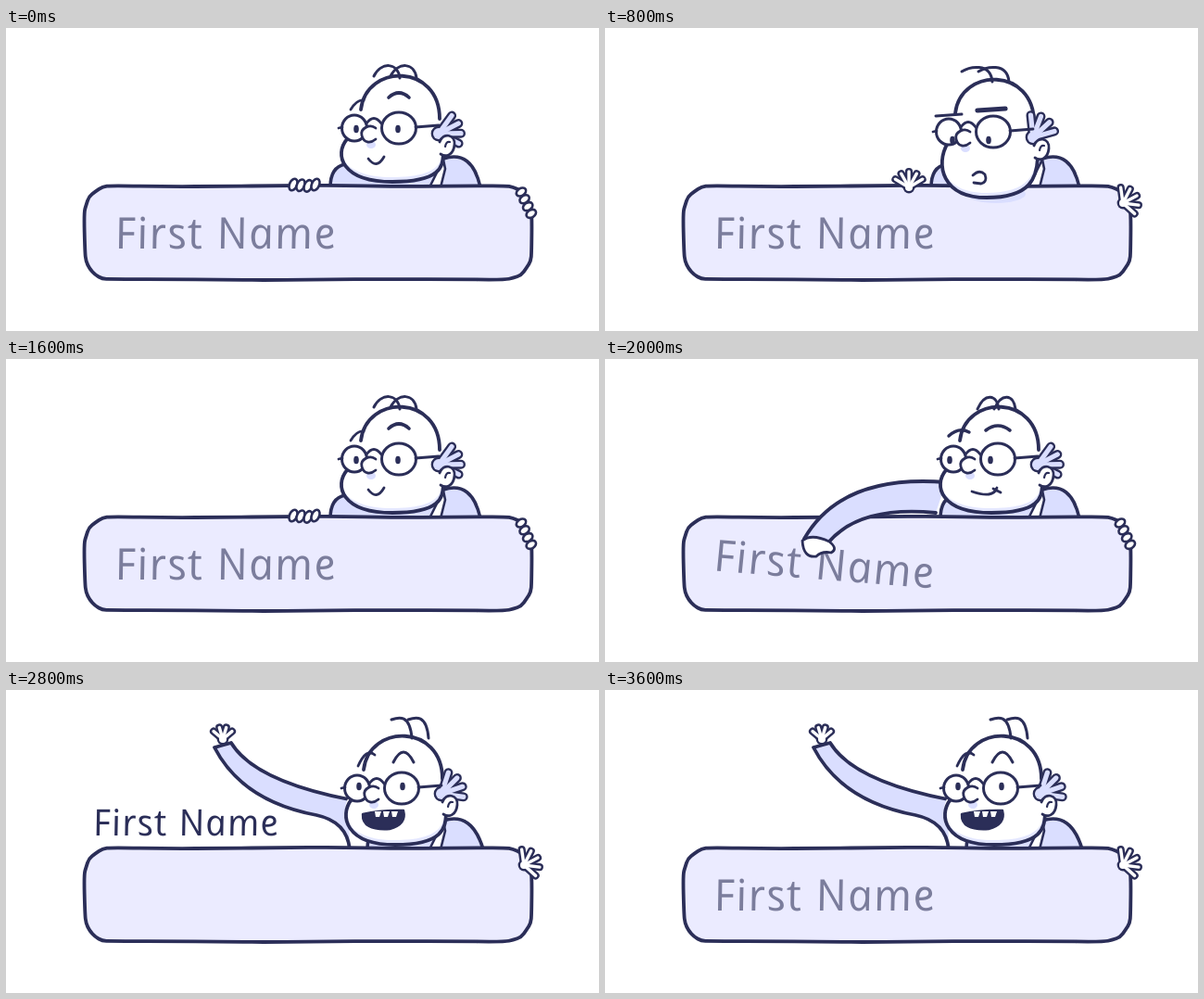
Animation of 640 by 327 pixels, one loop 3.8 s. Source, as an HTML page:

```html
<!DOCTYPE html>
<html lang="en">
<head>
<meta charset="utf-8">
<title>First Name field</title>
<style>
  html, body { margin: 0; width: 100%; height: 100%; overflow: hidden; background: #fff; }
  svg { display: block; width: 100%; height: 100%; }
  text { font: italic 47px "Open Sans", sans-serif; letter-spacing: 1.5px; }
</style>
</head>
<body>
<svg id="stage" viewBox="0 0 640 327" fill="none" stroke-linecap="round" stroke-linejoin="round"></svg>
<script>
const INK = '#2b2e58', GREY = '#7b7d9c', FIELD = '#ebebff', CLOTH = '#dadeff', SHADE = '#e4e7ff', WHITE = '#fff';
const STEP = 200, STEPS = 19;
const stage = document.getElementById('stage');

const path = (d, w = 3, fill = 'none', color = INK) =>
  `<path d="${d}" fill="${fill}" stroke="${color}" stroke-width="${w}"/>`;
const oval = (x, y, rx, ry, fill = WHITE, w = 0, turn = 0) =>
  `<ellipse rx="${rx}" ry="${ry}" fill="${fill}" stroke="${w ? INK : 'none'}" stroke-width="${w}" transform="translate(${x} ${y}) rotate(${turn})"/>`;
const group = (transform, body) => `<g transform="${transform}">${body}</g>`;
const move = (x, y, body) => group(`translate(${x} ${y})`, body);
const repeat = (n, fn) => Array.from({ length: n }, (_, i) => fn(i)).join('');

function noise(i, seed) {
  const v = Math.sin(i * 12.9 + seed * 78.2) * 43758.5;
  return v - Math.floor(v) - 0.5;
}

// Hand-drawn rounded box: corner arcs and edge points, each nudged a little.
function wobblyBox(left, top, right, bottom, r, seed) {
  const pts = [];
  const add = (x, y) => pts.push([x + noise(pts.length, seed) * 1.6, y + noise(pts.length + 99, seed) * 1.6]);
  for (let q = 0; q < 4; q++) {
    const cx = q === 0 || q === 3 ? right - r : left + r;
    const cy = q < 2 ? bottom - r : top + r;
    for (let k = 0; k <= 5; k++) {
      const a = (q + k / 5) * Math.PI / 2;
      add(cx + r * Math.cos(a), cy + r * Math.sin(a));
    }
    for (let k = 1; k < 7 && q % 2 === 0; k++) {
      const run = (right - left - 2 * r) * k / 7;
      add(q ? cx + run : cx - run, q ? top : bottom);
    }
  }
  const mid = i => {
    const a = pts[i % pts.length], b = pts[(i + 1) % pts.length];
    return `${(a[0] + b[0]) / 2} ${(a[1] + b[1]) / 2}`;
  };
  return 'M' + mid(pts.length - 1) + pts.map((p, i) => `Q${p[0]} ${p[1]} ${mid(i)}`).join('') + 'Z';
}
const BOXES = [1, 2].map(seed => path(wobblyBox(84.5, 170.5, 567.5, 271.5, 29, seed), 3.8, FIELD));

// Fingers or hair tips spreading from a palm; dir 0 points up.
function fan(x, y, dir, spread, n, len, fill = WHITE, width = 8.2, palm = 4) {
  const layer = (color, w, r) => oval(x, y, r, r, color) + repeat(n, i => {
    const a = (dir + spread * (i / (n - 1) - 0.5)) * Math.PI / 180;
    return path(`M${x} ${y}L${x + len * Math.sin(a)} ${y - len * Math.cos(a)}`, w, 'none', color);
  });
  return layer(INK, width, palm + 2.4) + layer(fill, width - 4.8, palm);
}

// The italic's single-storey letters, set upright.
const label = (x, y, size, color, turn = 0) => group(
  `translate(${x} ${y}) scale(${size}) rotate(${turn} 117 -18) skewX(11)`,
  `<text fill="${color}"><tspan x="0">First</tspan> <tspan x="110">Name</tspan></text>`);

// A pose is a few settings around the middle of the head.
const calm = {
  at: [425, 100], jaw: -65, chin: 66, left: 350, right: 512, tuft: 76,
  hair: { x: 0, tip: [-28, -2], lift: 16 },
  brows: [[-46, -17, 7, 5, 3, 2.8], [-1, -25, 11, 0, 5, 3.6]],
  gaze: [2, -1, 1],
  mouth: path('M-34 41Q-25 53 -17 39', 2.8)
};
const look = {
  ...calm, left: 362,
  hair: { x: 0, tip: [-23, 0], lift: 18 },
  brows: [[-43, -19, 11, 2, 4, 3.4], [-1, -23, 13, 0, 5, 3.6]],
  gaze: [-4, -8, 1],
  mouth: path('M-29 43Q-6 51 -2 39M-6 40L2 44', 2.8)
};
const peer = {
  ...calm, at: [420, 104], jaw: -58, chin: 79, tuft: 34, left: 352,
  hair: { x: -2, tip: [-33, -11], lift: 5 },
  brows: [[-49, -10, 14, 1, 0, 3], [-3, -16, 15, 1, 0, 5.2]],
  gaze: [4, -5, 9],
  mouth: path('M-23 55q7 -7 13 -1q3 8 -4 10l-8 -1', 2.8)
};
const worry = {
  ...peer, at: [419, 107], chin: 77,
  hair: { x: -2, tip: [-25, -24], lift: 0 },
  brows: [[-47, -12, 15, 2, 0, 3], [-1, -18, 16, 2, -2, 3.2]],
  mouth: path('M-23 50q9 -6 19 -1q5 6 1 12q-5 3 -10 0M-22 60h9', 2.8) + path('M-13 54h9v6h-7z', 2, INK)
};
const cheer = {
  ...calm, at: [428, 98], jaw: -63, chin: 69, tuft: 58, left: 390, right: 515,
  hair: { x: 10, tip: [-22, -20], lift: 3 },
  brows: [[-39, -22, 9, 6, 7, 2.8], [1, -20, 11, 0, 11, 3]],
  gaze: [2, 1, -2],
  mouth: path('M-43 36Q-22 31 1 32Q5 47 -14 52Q-44 54 -43 36Z', 2.4, INK) +
    repeat(3, i => path(`M${-30 + i * 9} 33h7l-2 6h-4z`, 0, WHITE))
};

const brow = ([x, y, half, tilt, arch, w]) =>
  path(`M${x - half} ${y + tilt}Q${x} ${y - 2 * arch} ${x + half} ${y - tilt}`, w);

const strand = ({ x, tip: [dx, dy], lift }, i) => {
  const rx = x + 18 * i, tx = rx + dx, ty = -46 + dy;
  return path(`M${tx} ${ty}C${tx + 8} ${ty - lift} ${rx - 2} ${-62 + dy / 2} ${rx} -46`, 3);
};

function head(p) {
  const { jaw, chin, gaze } = p;
  const face = `M${jaw + 8} 20C${jaw - 6} ${chin * 0.55} ${jaw + 2} ${chin} -8 ${chin}S46 ${chin * 0.72} 47 36`;
  const eye = (x, rx, ry, look) => oval(x, 8, rx, ry, WHITE, 3) + oval(x + look, 8 + gaze[2], 2.8, 4.3, INK);
  return move(...p.at,
    path(face, 0, SHADE) + move(-1, -5, path(face, 0, WHITE)) + oval(0, 0, 43, 45) +
    repeat(2, i => strand(p.hair, i)) +
    path('M-42 -12C-36 -62 43 -62 43 -2', 3.8) + path(face, 3.8) +
    fan(42, 14, p.tuft, 80, 4, 24, CLOTH, 10, 6) +
    path('M43 23C47 12 60 15 59 26S50 40 44 36', 2.8, WHITE) + path('M49 28q1 -6 5 -5', 2.2) +
    oval(-31, 26, 5, 4, CLOTH) +
    eye(-49, 13.5, 14, gaze[0]) + eye(-1, 18.5, 17, gaze[1]) +
    path('M-36 3Q-28 -8 -20 3M17 7L42 5M-66 8L-62 7', 2.8) +
    path('M-26 8C-32 3 -43 8 -41 16S-32 25 -26 20', 2.8, WHITE) +
    p.brows.map(brow).join('') + p.mouth);
}

const torso = ({ left, right }) =>
  path(`M${left} 172Q${left} 150 ${left + 16} 147L472 141Q503 131 ${right} 172`, 3.6, CLOTH) +
  path('M457 172L472 142L474 152L469 172', 2.6, WHITE);

const leftGrip = repeat(4, i => oval(310 + i * 8, 169 + i % 3 * 0.7, 4, 6.6, WHITE, 2.6, 24));
const rightGrip = repeat(4, i => oval(556 + i * 3.6, 177 + i * 7.8, 5.6, 4, WHITE, 2.6, -32));
const leftOpen = fan(328, 172, 0, 118, 5, 17);
const rightOpen = fan(559, 189, 62, 140, 5, 17);

const reachArm = x =>
  path(`M368 133Q${x + 40} 124 ${x} 194l26 4Q${x + 60} 158 357 166`, 3.8, CLOTH) +
  path(`M${x - 2} 196q10 -8 29 1q10 8 2 12q-10 -2 -16 4q-14 2 -15 -17z`, 2.8, WHITE);

const waveArm = turn => group(`rotate(${turn} 370 140)`,
  fan(234, 53, 0, 100, 4, 13) +
  path('M370 118Q268 98 243 57L225 62Q255 120 335 135Q368 142 371 172', 3.8, CLOTH));

function scene(n) {
  const odd = n % 2, box = BOXES[odd];
  const resting = label(120, 238, 1, GREY);

  if (n < 4 || n === 8)
    return torso(calm) + box + resting + move(0, -odd, head(calm)) + leftGrip + rightGrip;

  if (n < 8) {
    const p = odd ? worry : peer;
    return torso(p) + box + resting + oval(422, 179, 32, 10, CLOTH) + head(p) + move(0, -odd, leftOpen + rightOpen);
  }

  if (n < 11) {
    const far = n === 10;
    return torso(look) + box + (far ? label(120, 238, 1, GREY, 4.6) : resting) +
      reachArm(far ? 215 : 257) + head(look) + rightGrip;
  }

  // The label is flung up, waits above the field, then slides home.
  const flung = n === 11, up = odd && !flung;
  const place = flung ? label(106, 196, 0.92, INK, -5)
    : n < 16 ? label(96, 157, 0.84, INK)
    : n === 16 ? label(122, 204, 0.84, INK)
    : resting;
  const p = flung ? { ...cheer, hair: look.hair } : cheer;
  return torso(p) + waveArm(flung ? -14 : up ? 8 : 0) + box + place + move(0, up ? -2 : 0, head(p)) +
    move(up ? 4 : 0, 0, rightOpen);
}

let shown = -1;
function draw(now) {
  const n = Math.floor(now / STEP) % STEPS;
  if (n !== shown) {
    stage.innerHTML = scene(n);
    shown = n;
  }
  requestAnimationFrame(draw);
}
draw(performance.now());
</script>
</body>
</html>
```
